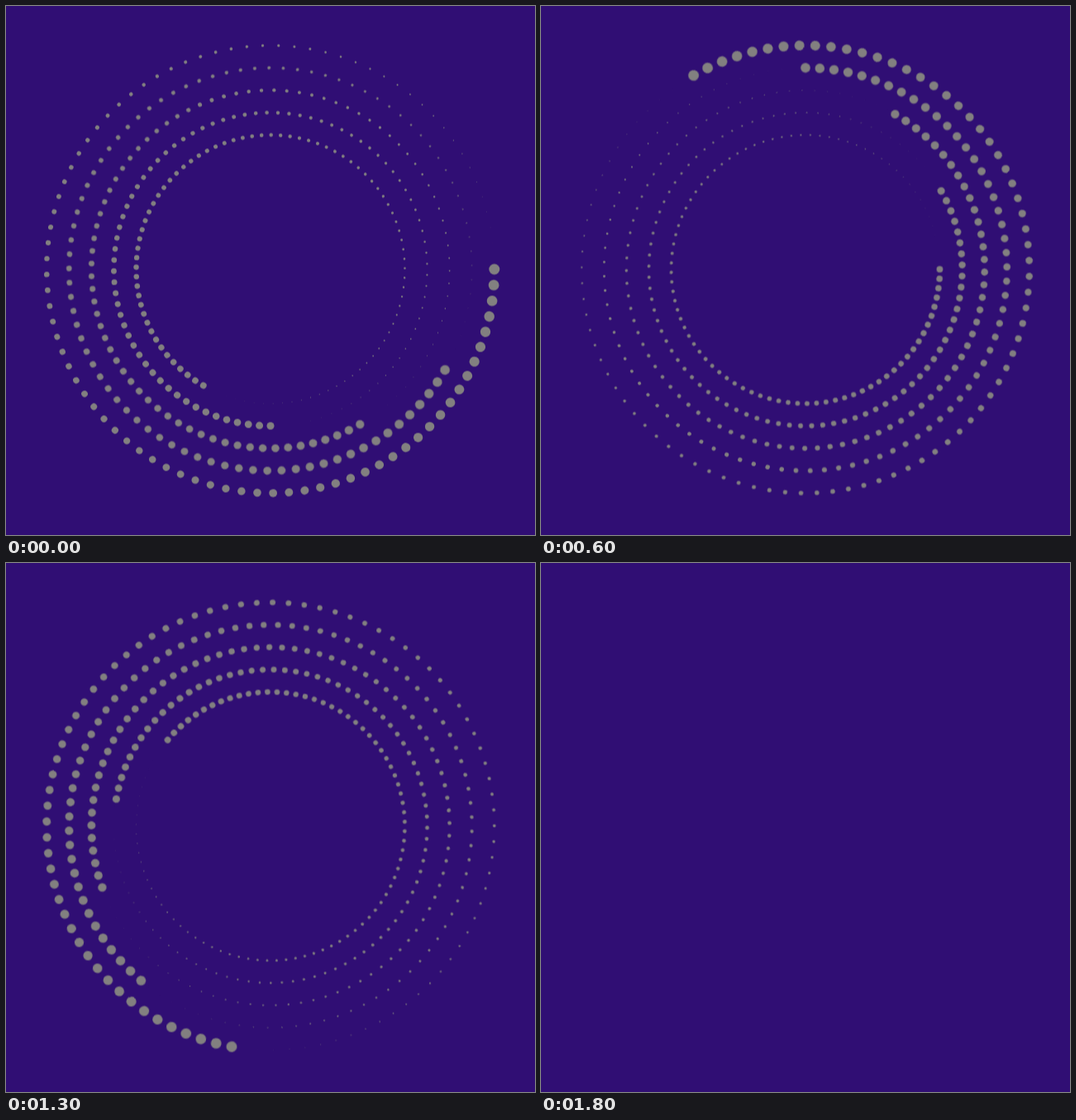
Write an HTML page without scripts that moves like this. It is 640 px wide and 640 px high and loops after 1.82 s.

```html
<!DOCTYPE html>
<html lang="en">
<head>
<meta charset="utf-8">
<title>Dotted rings</title>
<style>
  html, body { margin: 0; width: 100%; height: 100%; overflow: hidden; background: #300e74; }
  svg { display: block; width: 100%; height: 100%; }

  /* dot index from seven inherited bits; the radius falls evenly to zero */
  .dot {
    --i: calc(var(--a) + 2 * var(--b) + 4 * var(--c) + 8 * var(--d) + 16 * var(--e) + 32 * var(--f) + 64 * var(--g));
    r: max(0px, calc(6.5px * (1 - var(--i) / 89)));
    fill: #828080;
  }

  .spin { animation: spin 1820ms steps(91) -1ms infinite; }
  .blink { animation: blink 1820ms step-end -1ms infinite; }
  @keyframes spin { to { transform: rotate(-364deg); } }
  @keyframes blink { 0% { opacity: 1; } 98.9%, 100% { opacity: 0; } }
</style>
</head>
<body>
<svg viewBox="0 0 640 640">
  <defs>
    <circle id="n1" class="dot" cx="270.8"/>
    <!-- each group doubles the arc before it -->
    <g id="n2"><use href="#n1" style="--a:0"/><use href="#n1" style="--a:1" transform="rotate(4.0606)"/></g>
    <g id="n4"><use href="#n2" style="--b:0"/><use href="#n2" style="--b:1" transform="rotate(8.1212)"/></g>
    <g id="n8"><use href="#n4" style="--c:0"/><use href="#n4" style="--c:1" transform="rotate(16.2424)"/></g>
    <g id="n16"><use href="#n8" style="--d:0"/><use href="#n8" style="--d:1" transform="rotate(32.4848)"/></g>
    <g id="n32"><use href="#n16" style="--e:0"/><use href="#n16" style="--e:1" transform="rotate(64.9696)"/></g>
    <g id="n64"><use href="#n32" style="--f:0"/><use href="#n32" style="--f:1" transform="rotate(129.9392)"/></g>
    <g id="ring"><use href="#n64" style="--g:0"/><use href="#n32" style="--f:0;--g:1" transform="rotate(259.8784)"/></g>
  </defs>
  <g class="blink" transform="translate(320 318.5)">
    <g class="spin">
      <use href="#ring"/>
      <use href="#ring" transform="rotate(30) scale(.9)"/>
      <use href="#ring" transform="rotate(60) scale(.8)"/>
      <use href="#ring" transform="rotate(90) scale(.7)"/>
      <use href="#ring" transform="rotate(120) scale(.6)"/>
    </g>
  </g>
</svg>
</body>
</html>
```
